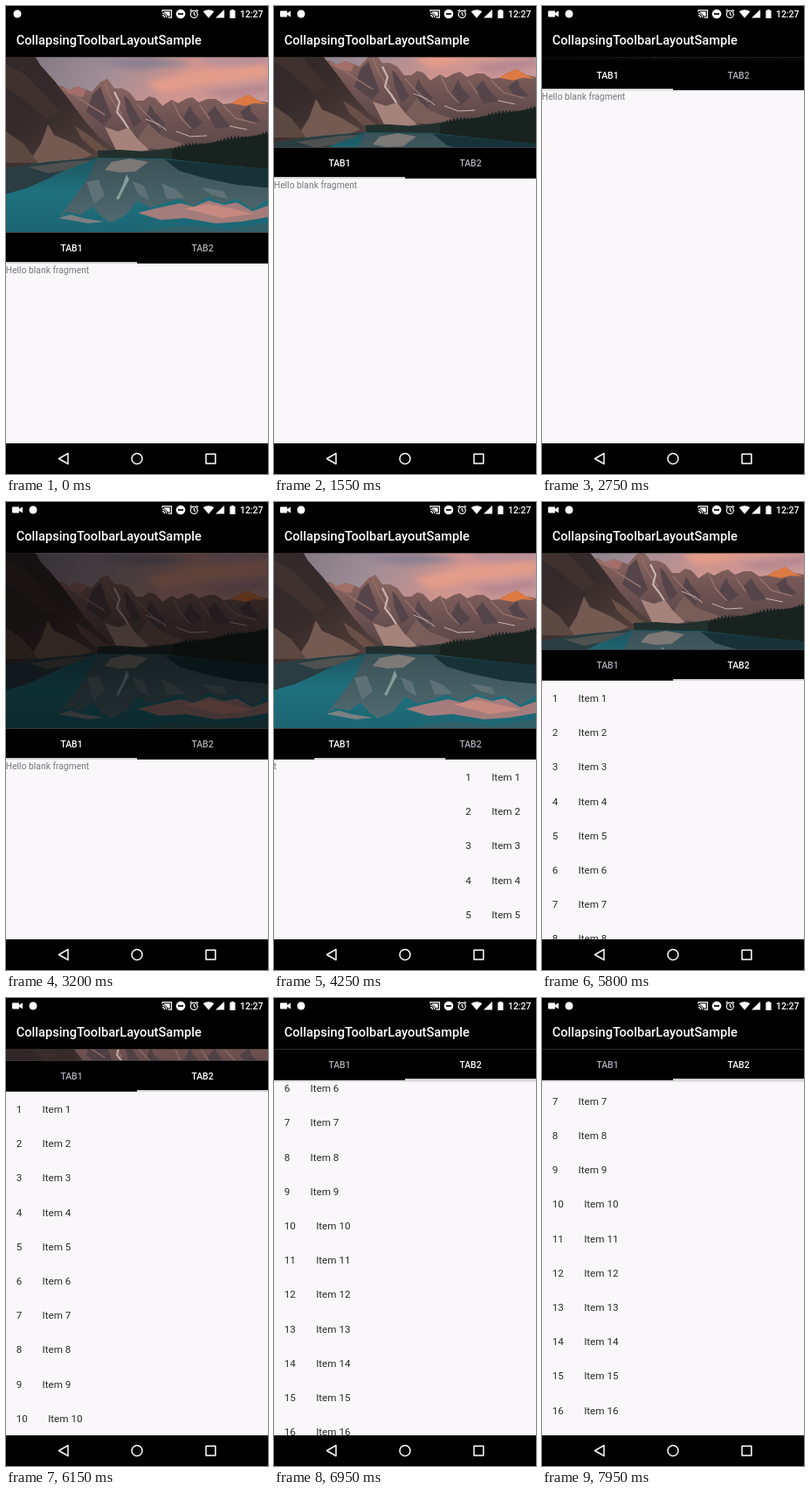
An HTML page that plays this animation: 300 by 534 pixels, repeating every 8 s.

```html
<!DOCTYPE html>
<html lang="en">
<head>
<meta charset="utf-8">
<title>Collapsing toolbar</title>
<style>
html, body { margin: 0; width: 100%; height: 100%; overflow: hidden; background: #000; }
svg { display: block; }
#stage { width: 300px; height: 534px; }
text { font-family: Roboto, "Noto Sans", sans-serif; white-space: pre; }
.title { font-size: 14.67px; font-weight: 500; fill: #fff; }
.tab { font-size: 10.4px; font-weight: 500; text-anchor: middle; }
.clock { font-size: 10.4px; font-weight: 500; fill: #fff; }
.row { font-size: 11.67px; fill: #2b2a2d; }
.hello { font-size: 10.3px; fill: #79777c; }
</style>
</head>
<body>
<svg id="stage" viewBox="0 0 300 534">
  <defs>
    <linearGradient id="sky" x1="0" y1="0" x2="1" y2="0.25">
      <stop offset="0" stop-color="#77717b"/>
      <stop offset="0.4" stop-color="#a08d96"/>
      <stop offset="0.7" stop-color="#cf948e"/>
      <stop offset="1" stop-color="#c9989a"/>
    </linearGradient>
    <linearGradient id="rock" x1="0" y1="0" x2="0" y2="1">
      <stop offset="0" stop-color="#8b6661"/>
      <stop offset="0.55" stop-color="#6a5050"/>
      <stop offset="1" stop-color="#4f4141"/>
    </linearGradient>
    <linearGradient id="slope" x1="0" y1="0" x2="0.7" y2="1">
      <stop offset="0" stop-color="#30282a"/>
      <stop offset="0.55" stop-color="#372b2b"/>
      <stop offset="1" stop-color="#54413c"/>
    </linearGradient>
    <linearGradient id="lake" x1="0" y1="0" x2="0" y2="1">
      <stop offset="0" stop-color="#1d5560"/>
      <stop offset="0.3" stop-color="#1f707d"/>
      <stop offset="0.65" stop-color="#1d6674"/>
    </linearGradient>
    <linearGradient id="mirror" x1="0" y1="0" x2="0" y2="1">
      <stop offset="0" stop-color="#3a5157"/>
      <stop offset="1" stop-color="#4f6a70"/>
    </linearGradient>
    <filter id="wide"><feGaussianBlur stdDeviation="3"/></filter>
    <filter id="fine"><feGaussianBlur stdDeviation="0.7"/></filter>
  </defs>

  <rect width="300" height="534" fill="#f9f7fa"/>
  <g id="page1"><text class="hello" x="-0.2" y="304.6">Hello blank fragment</text></g>
  <g id="page2"></g>

  <svg id="photo" x="0" y="58.3" width="300" height="200" overflow="hidden">
    <g id="scene">
      <rect y="50" width="300" height="130" fill="url(#sky)"/>
      <g filter="url(#wide)">
        <path d="M95 62L165 58L215 66L150 73Z" fill="#8d8190"/>
        <path d="M160 88L215 74L300 66V82L225 90L180 100Z" fill="#e39c89"/>
        <path d="M215 56H300V66L245 69Z" fill="#b78f99"/>
        <path d="M225 98L300 88V98L250 106Z" fill="#b78790"/>
      </g>
      <g filter="url(#fine)">
        <path d="M55 92L63 91L72 96L82 92L91 95L98 98L108 87L116 83L124 94L133 94L141 98L149 108L157 108L164 103L171 105L179 114L190 107L197 111L206 106L213 104L221 110L231 106L240 106L249 112L258 111L266 106L278 101L289 108L300 110V180H55Z" fill="url(#rock)"/>
        <path d="M258 111L266 106L278 101L289 108L299 112L284 111L274 114Z" fill="#dd7a44"/>
        <path d="M62 93L72 96L82 92L92 96L88 104L74 101Z" fill="#a36f68"/>
        <g fill="#55454a">
          <path d="M99 101L108 92L113 106L121 126L112 136L92 121Z"/>
          <path d="M135 102L140 106L147 118L155 132L146 139L138 120Z"/>
          <path d="M165 112L170 121L182 134L174 148L160 128Z"/>
          <path d="M211 113L214 121L225 133L211 143L203 128Z"/>
          <path d="M239 114L245 123L258 138L240 140L231 123Z"/>
          <path d="M279 113L281 121L292 132L276 133L268 121Z"/>
        </g>
        <path d="M113 88L120 105L133 124M150 112L163 126L177 139M191 109L199 126L212 140M222 113L233 129M249 114L263 128L286 134M75 99L92 111L113 124" fill="none" stroke="#94706a" stroke-width="1.5"/>
        <g fill="none" stroke="#c8b5b2" stroke-linejoin="round">
          <path d="M124 98L130 110L127 121L134 130L141 141" stroke-width="2.2"/>
          <path d="M160 129L175 135L184 142M195 143L211 149L230 148M256 137L276 141" stroke-width="1"/>
        </g>
        <path d="M113 138L128 143L141 139L150 151L164 164L145 168L126 164Z" fill="#a5837b"/>
        <path d="M151 151L163 134L178 148L205 158L180 164L162 162Z" fill="#795d59"/>
        <path d="M-5 45H26L39 67L56 86L73 108L91 132L108 151L128 166V190H-5Z" fill="url(#slope)"/>
        <path d="M0 66L23 79L44 101L62 121L45 128L17 104L0 93Z" fill="#40312f"/>
        <path d="M48 135L55 147L78 157L99 170L75 179L26 179L40 157Z" fill="#745a51"/>
        <path d="M0 143L19 156L37 179H0Z" fill="#5b4840"/>
        <path d="M79 137L96 148L112 161L123 168L103 166L86 151Z" fill="#695047"/>
        <path id="trees" fill="#18231f"/>
        <path d="M105 165L130 164L160 166L190 162V176H105Z" fill="#22302d"/>

        <path d="M-5 186L46 178L104 173L182 174L245 181L305 187V300H-5Z" fill="url(#lake)"/>
        <path d="M-5 186L46 178L104 173L72 185L46 198L23 208L-5 216Z" fill="#293d42"/>
        <path d="M26 184L76 177L98 176L69 187L48 191Z" fill="#4f5150"/>
        <path d="M104 174L180 175L230 188L305 193V217L282 232L264 220L248 225L232 218L214 228L198 220L181 225L165 230L150 222L137 239L119 247L109 240L99 229L86 238L70 235L61 241L80 216L94 196Z" fill="url(#mirror)"/>
        <path d="M121 178L142 174L163 178L148 189L130 190L113 187Z" fill="#7c7976"/>
        <path d="M138 192L141 198L135 209L129 221L126 220L133 206Z" fill="#869c9c"/>
        <path d="M182 175L245 181L305 187V208L264 204L226 196L198 188Z" fill="#163238"/>
        <g fill="#5e7176">
          <path d="M92 201L106 198L113 216L101 226Z"/>
          <path d="M145 200L158 205L164 222L151 215Z"/>
          <path d="M178 202L194 209L205 219L184 220Z"/>
          <path d="M224 207L249 211L254 220L236 216Z"/>
        </g>
        <path d="M151 236L171 231L200 225L215 229L232 222L250 227L264 224L282 234L305 226V240L270 246L240 248L205 242L177 244Z" fill="#a37c7b"/>
        <path d="M205 231L232 226L258 231L283 237L247 242Z" fill="#c78980"/>
        <path d="M60 242L74 238L88 242L113 246L94 248Z" fill="#7c8083"/>
        <path d="M150 258L205 250L252 255L305 247V300H150Z" fill="#315f68"/>
      </g>
    </g>
    <rect id="scrim" width="300" height="201" opacity="0"/>
  </svg>

  <g id="tabs">
    <rect y="258.3" width="300" height="35.5"/>
    <text class="tab" x="75" y="280.2">TAB1</text>
    <text class="tab" x="225" y="280.2">TAB2</text>
    <rect id="marker" y="292.2" width="150" height="1.6" fill="#fff"/>
    <rect id="shade" y="293.8" width="300" height="2" opacity="0.1"/>
  </g>

  <rect width="300" height="58.4"/>
  <text class="title" x="11.7" y="43.8">CollapsingToolbarLayoutSample</text>

  <g fill="#fff">
    <path id="camera" d="M8 5.5H15V8L19 5.5V12.5L15 10V12.5H8Q7 12.5 7 11.5V6.5Q7 5.5 8 5.5Z"/>
    <circle id="badge" cx="13" cy="9" r="4.5"/>
    <g fill="none" stroke="#fff" stroke-width="1.2">
      <path d="M179 6.5V4.8H189.5V13.2H185.5M179 8.2A5 5 0 0 1 183.8 13.2M179 10.7A2.5 2.5 0 0 1 181.5 13.2"/>
      <circle cx="215.3" cy="9.4" r="4"/>
      <path d="M215.3 7V9.7L217 10.8M210.6 6L212.8 4.2M220 6L217.8 4.2"/>
    </g>
    <path d="M181 6.6H187.7V11.4H185.2Q184 8.2 181 7.6Z"/>
    <circle cx="200" cy="9" r="5.3"/>
    <rect x="197" y="8.2" width="6" height="1.7" fill="#000"/>
    <path d="M225.7 6.3Q232 2.2 238.3 6.3L232 13.8Z"/>
    <path d="M240 13.5L250 4V13.5Z"/>
    <path d="M256.3 5H258V4H260.8V5H262.5V14H256.3Z"/>
  </g>
  <text class="clock" x="268" y="13">12:27</text>

  <rect y="499" width="300" height="35"/>
  <g fill="none" stroke="#fff" stroke-width="1.5" stroke-linejoin="round">
    <path d="M60.5 516.5L71 510.5V522.5Z"/>
    <circle cx="150" cy="516.5" r="6"/>
    <rect x="229" y="511.2" width="10.8" height="10.8"/>
  </g>
</svg>

<script>
const LOOP = 8000, STEP = 50, ROW = 39.2, RANGE = 200;
const $ = id => document.getElementById(id);
const set = (el, attrs) => {
  for (const key in attrs) el.setAttribute(key, attrs[key]);
};
const move = (el, x, y) => set(el, { transform: `translate(${x} ${y})` });

// Each track holds [time, value] steps, joined by straight lines.
const collapse = [[1300, 0], [1350, 14], [1450, 52], [1550, 97], [1700, 152], [1850, 187],
  [2000, RANGE], [2700, RANGE], [2850, 193], [3000, 180], [3080, 160], [3200, 0],
  [5450, 0], [5500, 13.8], [5700, 62], [5900, 118], [6150, 187], [6230, RANGE]];
const swipe = [[3950, 0], [4000, .02], [4250, .308], [4450, .58], [4600, .8], [4800, .95], [5150, 1]];
const listScroll = [[6230, 0], [6400, 55], [6600, 120], [6850, 188], [7100, 235], [7450, 262],
  [7750, 262], [7950, 231.5]];
const dim = [[1700, 0], [2000, .4], [2300, 1], [3080, 1], [3120, .8], [3200, .58], [3300, .37],
  [3450, .16], [3600, .05], [3750, 0], [6050, 0], [6150, .08], [6400, .6], [6650, 1]];

function at(track, t) {
  const i = track.findIndex(p => p[0] > t);
  if (i === 0) return track[0][1];
  if (i < 0) return track[track.length - 1][1];
  const [t0, a] = track[i - 1], [t1, b] = track[i];
  return a + (b - a) * (t - t0) / (t1 - t0);
}

function addRows(count) {
  for (let n = 1; n <= count; n++) {
    const y = 318 + (n - 1) * ROW;
    const x = 11.7 + 6.57 * String(n).length + 23.3;
    for (const [left, label] of [[11.7, n], [x, "Item " + n]]) {
      const text = document.createElementNS("http://www.w3.org/2000/svg", "text");
      set(text, { class: "row", x: left, y });
      text.textContent = label;
      $("page2").append(text);
    }
  }
}

function growTrees() {
  let d = "M168 176";
  for (let x = 168; x < 304; x += 4) {
    const top = 165 - (x - 168) * .16;
    d += `L${x} ${top + 2}L${x + 2} ${top - 1 - 2 * Math.sin(x * 1.7)}`;
  }
  $("trees").setAttribute("d", d + "L305 143V189L245 182L182 176Z");
}

const labels = document.querySelectorAll(".tab");

function draw(t) {
  const s = at(collapse, t), p = at(swipe, t);
  move($("page1"), -300 * p, -s);
  move($("page2"), 300 * (1 - p), -s - at(listScroll, t));
  move($("tabs"), 0, -s);
  set($("photo"), { height: Math.max(RANGE - s, .01) });
  move($("scene"), 0, -58.3 - .3 * s);
  set($("scrim"), { opacity: at(dim, t) });
  set($("marker"), { x: 150 * p });
  set($("shade"), { opacity: s < RANGE ? 0 : .1 });
  labels.forEach((el, i) => set(el, { fill: (t >= 4500) == i ? "#fff" : "#b0adb9" }));
  set($("camera"), { opacity: t < 50 ? 0 : 1 });
  set($("badge"), { cx: t < 50 ? 13 : 31 });
}

addRows(24);
growTrees();
draw(0);
const start = performance.now();
(function tick() {
  const t = (performance.now() - start) % LOOP;
  draw(Math.floor(t / STEP) * STEP);
  requestAnimationFrame(tick);
})();
</script>
</body>
</html>
```
